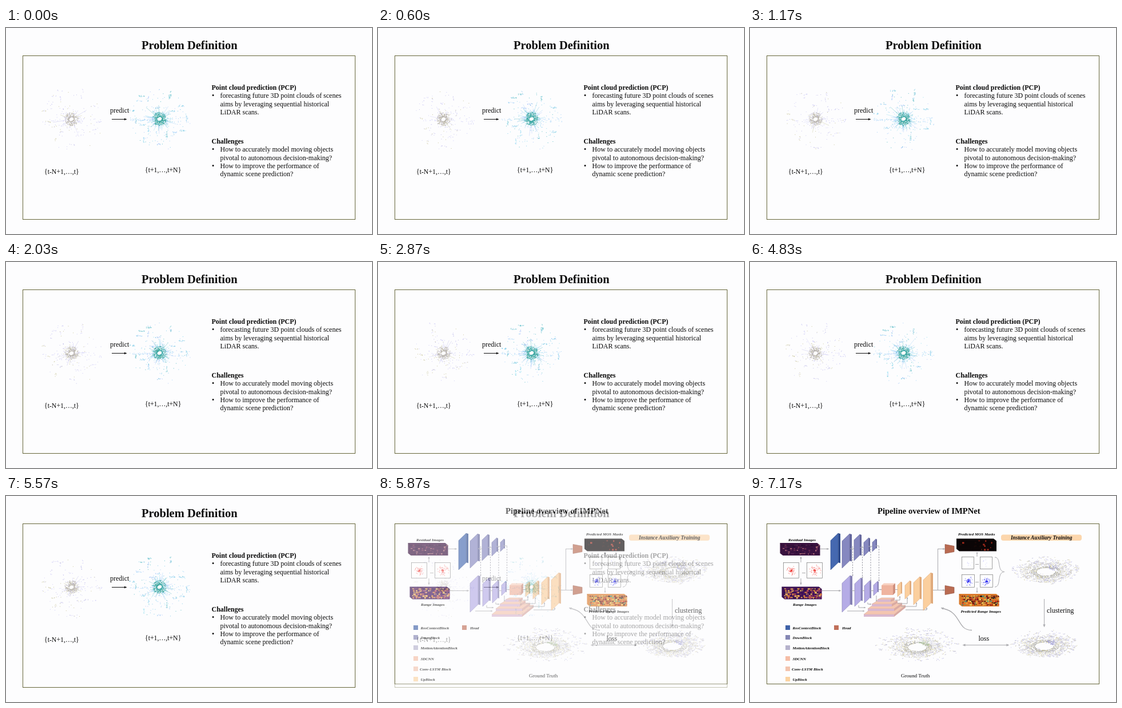
Recreate the animation shown at these times as an HTML page with a canvas. Size 640 by 360 pixels, loop 8000 ms.

```html
<!DOCTYPE html>
<html lang="en">
<head>
<meta charset="utf-8">
<title>Point cloud prediction</title>
<style>
html, body { margin: 0; width: 100%; height: 100%; overflow: hidden; background: #fdfdfe; }
.slide { position: absolute; left: 0; top: 0; width: 640px; height: 360px; background: #fdfdfe; }
.slide canvas, .slide svg { position: absolute; left: 0; top: 0; }
text { font-family: "Liberation Serif", "Times New Roman", serif; font-size: 12px; fill: #0a0a0a; white-space: pre; }
.b { font-weight: bold; }
.l { font-weight: bold; font-style: italic; font-size: 7px; }
</style>
</head>
<body>
<div class="slide">
  <canvas id="define" width="640" height="360"></canvas>
  <svg width="640" height="360">
    <text class="b" x="237" y="36.5" style="font-size:20.5px">Problem Definition</text>
    <text class="b" x="359.5" y="108">Point cloud prediction (PCP)</text>
    <text x="360" y="122.3">•</text>
    <text x="374.5" y="122.3">forecasting future 3D point clouds of scenes</text>
    <text x="374.5" y="136.7">aims by leveraging sequential historical</text>
    <text x="374.5" y="151">LiDAR scans.</text>
    <text class="b" x="359.5" y="202">Challenges</text>
    <text x="360" y="216.3">•</text>
    <text x="374.5" y="216.3">How to accurately model moving objects</text>
    <text x="374.5" y="230.7">pivotal to autonomous decision-making?</text>
    <text x="360" y="245">•</text>
    <text x="374.5" y="245">How to improve the performance of</text>
    <text x="374.5" y="259.4">dynamic scene prediction?</text>
    <text x="182" y="148">predict</text>
    <text x="67" y="255" style="font-size:11.8px">{t-N+1,…,t}</text>
    <text x="243" y="252" style="font-size:11.8px">{t+1,…,t+N}</text>
  </svg>
</div>
<div class="slide" id="second">
  <canvas id="pipeline" width="640" height="360"></canvas>
  <svg width="640" height="360">
    <text class="b" x="223" y="31" style="font-size:14.6px">Pipeline overview of IMPNet</text>
    <text class="l" x="67" y="78.5">Residual Images</text>
    <text class="l" x="75" y="192">Range Images</text>
    <text class="l" x="364" y="69">Predicted MOS Masks</text>
    <text class="l" x="368.5" y="204">Predicted Range Images</text>
    <text class="l" x="456" y="76" style="font-size:9.3px">Instance Auxiliary Training</text>
    <text class="l" x="74.5" y="232.5">ResContextBlock</text>
    <text class="l" x="74.5" y="249.5">DownBlock</text>
    <text class="l" x="74.5" y="268">MotionAttentionBlock</text>
    <text class="l" x="74.5" y="287">3DCNN</text>
    <text class="l" x="73" y="305">Conv-LSTM Block</text>
    <text class="l" x="74.5" y="323">UpBlock</text>
    <text class="l" x="161" y="232.5">Head</text>
    <text x="264" y="317" style="font-size:9.2px">Ground Truth</text>
    <text x="519" y="204">clustering</text>
    <text x="399.5" y="253">loss</text>
    <text x="91" y="135" style="font-size:8px">...</text>
    <text x="394" y="120" style="font-size:8px">...</text>
    <text x="394" y="151" style="font-size:8px">...</text>
  </svg>
</div>
<script>
const LOOP = 8000, FADE_START = 5700, FADE_TIME = 270, SCAN = 100;
// spans of time in which the scans play; between them they hold
const PLAYING = [[30, 70], [270, 700], [870, 1370], [1530, 2330], [2370, 3130],
  [3200, 3300], [3500, 4300], [4370, 5170], [5200, 5570]];
// clumps of points seen around the vehicle
const CLUMPS = [[-20, -48], [-20, -36], [17, -37], [19, -46], [-36, -28], [-3, -24], [-28, 38],
  [0, 46], [12, 28], [26, 23], [38, -22], [47, 3], [-42, 2], [38, 20], [-30, 14], [-32, -42],
  [-14, -16], [22, -15], [-20, 25], [-48, -12]];
const GREY = '#a9a9ad';
const second = document.getElementById('second');
const define = document.getElementById('define').getContext('2d');
const pipeline = document.getElementById('pipeline').getContext('2d');

function random(seed) {
  let s = seed * 2654435761 >>> 0;
  return () => {
    s = s + 0x6D2B79F5 >>> 0;
    let v = Math.imul(s ^ s >>> 15, 1 | s);
    v ^= v + Math.imul(v ^ v >>> 7, 61 | v);
    return ((v ^ v >>> 14) >>> 0) / 4294967296;
  };
}

function dot(c, x, y, color, size = 1) {
  c.fillStyle = color;
  c.fillRect(x, y, size, size);
}

function line(c, pts, color = GREY, width = 1, dash = []) {
  c.strokeStyle = color;
  c.lineWidth = width;
  c.setLineDash(dash);
  c.beginPath();
  pts.forEach(p => c.lineTo(...p));
  c.stroke();
  c.setLineDash([]);
}

function shape(c, pts, fill, edge) {
  c.beginPath();
  pts.forEach(p => c.lineTo(...p));
  c.closePath();
  c.fillStyle = fill;
  c.fill();
  if (edge) {
    c.strokeStyle = edge;
    c.lineWidth = 0.6;
    c.stroke();
  }
}

function arrow(c, x0, y0, x1, y1, color = GREY, size = 4, dash = []) {
  line(c, [[x0, y0], [x1, y1]], color, 1, dash);
  const a = Math.atan2(y1 - y0, x1 - x0);
  const tip = b => [x1 - size * Math.cos(a + b), y1 - size * Math.sin(a + b)];
  shape(c, [[x1, y1], tip(0.45), tip(-0.45)], color);
}

function frame(c, bottom) {
  c.strokeStyle = '#66663a';
  c.lineWidth = 1;
  c.strokeRect(29.5, 48.5, 581, bottom - 48.5);
}

// --- first slide: scans seen from above ---

function scan(c, cx, cy, step, look) {
  const fixed = random(look.seed), live = random(look.seed * 100 + step);
  const pick = r => look.far[Math.floor(r() * look.far.length)];

  for (const [x, y] of CLUMPS) {
    const phase = fixed() * 9, upright = fixed() < 0.5, color = pick(fixed);
    const shift = (step * 0.7 + phase) % 9 - 4.5;
    const seen = live() < 0.85;
    for (let i = 0; i < look.clump; i++) {
      const u = (fixed() - 0.5) * 10, v = (fixed() - 0.5) * 2.5;
      if (seen && live() < 0.75)
        dot(c, cx + x + (upright ? v : u), cy + y + shift + (upright ? u : v), live() < 0.7 ? color : pick(live));
    }
  }
  for (let i = 0; i < look.loose; i++) {
    const a = fixed() * Math.PI * 2, r = 12 + 42 * fixed() ** 1.8;
    if (live() < 0.65) dot(c, cx + r * Math.cos(a) + live(), cy + r * Math.sin(a) + live() * 2, pick(fixed));
  }
  // level streaks along the road
  for (let i = 0; i < look.road; i++) {
    const x = -53 + 106 * fixed();
    if (live() < 0.6) dot(c, cx + x, cy + 1 + (fixed() - 0.5) * (x < 0 ? 3 : 9), look.far[0]);
  }
  for (let i = 0; i < look.rays; i++) {
    const a = fixed() * 6.283 + (live() - 0.5) * 0.08, r = 15 + 18 * fixed() * live();
    c.globalAlpha = 0.55;
    line(c, [[cx + 9 * Math.cos(a), cy + 9 * Math.sin(a)], [cx + r * Math.cos(a), cy + r * Math.sin(a)]], pick(fixed), 0.8);
    c.globalAlpha = 1;
  }
  for (let i = 0; i < look.core; i++) {
    const a = fixed() * 6.283, r = 3.5 + 8.5 * fixed() ** 1.4;
    const color = look.near[Math.floor(fixed() * look.near.length)];
    dot(c, cx + r * Math.cos(a) + (live() - 0.5) - 0.5, cy + r * Math.sin(a) + (live() - 0.5) - 0.5, color);
  }
  c.fillStyle = '#fdfdfe';
  c.beginPath();
  c.ellipse(cx, cy, 4, 2.8, -0.4, 0, 7);
  c.fill();
}

const past = { seed: 5, clump: 7, loose: 130, road: 45, rays: 12, core: 330,
  far: ['#cbc9f6', '#d2cff5', '#c4c1ea', '#c9c59c'], near: ['#bcb7a6', '#c9c4b0', '#b9b4d2', '#aaa69a'] };
const future = { seed: 9, clump: 15, loose: 200, road: 100, rays: 46, core: 480,
  far: ['#a4d2f8', '#84cdea', '#b2c9fa', '#5cbcc6', '#96def0'], near: ['#2fa19a', '#46aeaa', '#38a08e', '#66bccd'] };

let lastStep = -1;
function drawDefine(step) {
  if (step === lastStep) return;
  lastStep = step;
  define.clearRect(0, 0, 640, 360);
  frame(define, 334.5);
  arrow(define, 185, 159.5, 211, 159.5, '#111', 4.5);
  scan(define, 114.5, 159.5, step, past);
  scan(define, 268.5, 159, step, future);
}

// --- second slide ---

function panel(c, x, y0, y1, w, color, side) {
  const s = w * 0.75, e = Math.max(1.5, w * 0.22);
  shape(c, [[x, y0 + s], [x + w - e, y0], [x + w - e, y1 - s], [x, y1]], color, side);
  shape(c, [[x + w - e, y0], [x + w, y0 + 1], [x + w, y1 - s + 1], [x + w - e, y1 - s]], side);
}

function slab(c, x, y, seed, base, spots, count) {
  const r = random(seed);
  const ends = [[x, y], [x + 65, y], [x + 70, y + 4], [x + 70, y + 22], [x + 5, y + 22], [x, y + 18]];
  c.save();
  shape(c, ends, base);
  c.clip();
  for (let i = 0; i < count; i++) {
    c.fillStyle = spots[Math.floor(r() * spots.length)];
    c.fillRect(x + 4 + r() * 65, y + 3 + Math.floor(r() * 6) * 3, 1 + r() * 3, 1 + r() * 2);
  }
  c.restore();
  line(c, [[x, y + 1], [x + 5, y + 5], [x + 70, y + 5]], 'rgba(0,0,0,.35)', 0.7);
}

function tile(c, x, y, size, color, seed, dense) {
  const r = random(seed);
  c.fillStyle = '#fff';
  c.fillRect(x, y, size, size);
  c.strokeStyle = '#777';
  c.lineWidth = 0.7;
  c.strokeRect(x, y, size, size);
  for (let i = 0; i < (dense ? 95 : 7); i++) {
    const a = r() * 6.283, d = size * (dense ? 0.4 * r() ** 2.3 : 0.35 * r());
    c.globalAlpha = dense ? 0.75 : 0.3;
    dot(c, x + size / 2 + d * Math.cos(a), y + size / 2 + d * Math.sin(a), color);
  }
  c.globalAlpha = 1;
}

// a scan seen from a low angle: rings on the ground with walls behind
function ground(c, cx, cy, w, seed, tint) {
  const r = random(seed), tones = ['#c9c7ee', '#b9b7cc', '#d4cfa4', '#c3c1e6'];
  for (let i = 0; i < 210; i++) {
    const a = r() * 6.283, d = 0.45 + 0.55 * r();
    const x = cx + w * d * Math.cos(a), y = cy + w * 0.38 * d * Math.sin(a);
    const len = 1 + Math.floor(r() * 4), up = r() * 7;
    for (let k = 0; k < len; k++) dot(c, x + k * 1.2, y - up + k * (r() - 0.5), tones[Math.floor(r() * 4)]);
  }
  for (let ring = 0; ring < 11; ring++) {
    const rad = 17 + ring * 2.7, gap = r() * 6.283;
    for (let a = 0; a < 6.283; a += 1.1 / rad) {
      if (r() < 0.25 + ring * 0.045 || Math.abs(a - gap) < 0.3) continue;
      const near = ring < 4;
      c.globalAlpha = near ? 0.85 : 0.6;
      dot(c, cx + rad * Math.cos(a), cy + rad * 0.42 * Math.sin(a),
        r() < 0.18 ? '#c8bc68' : near ? '#96958f' : r() < 0.5 ? '#a9a7c8' : '#b4b3ac');
    }
  }
  c.globalAlpha = 1;
  for (let i = 0; i < 34; i++) dot(c, cx + 3 + r() * 17, cy - 11 + r() * 9, tint, 1.2);
  c.fillStyle = '#fdfdfe';
  c.beginPath();
  c.ellipse(cx, cy, 14, 4.5, 0, 0, 7);
  c.fill();
}

function drawPipeline() {
  const c = pipeline;
  frame(c, 328.5);

  // inputs
  slab(c, 52.5, 82, 3, '#39123f', ['#50204f', '#682a50', '#2a0c36', '#a06070'], 60);
  slab(c, 55.5, 158.5, 4, '#3a1152', ['#e08a3c', '#f0b860', '#7a2a68', '#b84a58', '#4c1668'], 190);
  tile(c, 58.5, 116.5, 27, '#f03a34', 11, true);
  tile(c, 99.5, 116.5, 27, '#f03a34', 12, true);
  arrow(c, 89, 116, 89, 106);
  arrow(c, 89, 144, 89, 155);
  arrow(c, 123, 92.5, 138, 92.5);
  arrow(c, 126, 165.5, 159, 165.5);

  // encoders
  panel(c, 141, 65, 129, 17, '#4568b0', '#2c4a8c');
  [[161, 66, 126, 17], [182, 67, 113, 13], [199, 73, 105, 11], [214, 75, 97, 8]]
    .forEach(p => panel(c, ...p, '#8688c0', '#5f6299'));
  [[161, 139, 203, 18], [183, 143, 193, 14], [200, 148, 187, 12], [216, 149, 174, 9]]
    .forEach(p => panel(c, ...p, '#b5ace6', '#8580b4'));
  [[179.5, 140], [196.5, 144], [211, 149], [225.5, 149]].forEach(([x, y]) => arrow(c, x, 88, x, y, '#9a9aa4', 3, [2.5, 2]));
  [[178, 92], [195, 90], [210, 88], [222, 87]].forEach(([x, y]) => line(c, [[x - 3, y], [x + 4, y]]));
  line(c, [[178, 165.5], [183, 165.5]]);
  line(c, [[196, 165.5], [200, 165.5]]);
  line(c, [[211, 165.5], [216, 165.5]]);
  arrow(c, 225, 163.5, 231, 163.5, GREY, 3);

  // skip links and flat plates
  [[170, 201, 200], [190, 191, 202], [206, 186, 212], [221, 174, 223]].forEach(([x, y, to], i) => {
    const low = 201 - i * 6;
    line(c, [[x, y], [x, low]]);
    arrow(c, x, low, to, low, GREY, 3);
  });
  [[199, 211, 73, 20], [206, 201, 60, 14], [213, 193, 45, 10], [223, 185, 30, 7]].forEach(([x, y, w, h]) => {
    shape(c, [[x, y - 4], [x + w - h, y - 4], [x + w, y - h], [x + h, y - h]], '#f4c6b0', '#d5a8a2');
    shape(c, [[x, y - 4], [x + w - h, y - 4], [x + w - h, y], [x, y]], '#d9b8cf');
    shape(c, [[x + w - h, y - 4], [x + w, y - h], [x + w, y - h + 4], [x + w - h, y]], '#d9aaa2');
  });
  [[254, 182, 262, 178], [258, 188, 275, 180], [264, 193, 291, 189], [272, 199, 309, 198]].forEach(([x, y, to, end]) => {
    line(c, [[x, y], [to, y]]);
    arrow(c, to, y, to, end - 3, GREY, 3);
  });
  shape(c, [[230, 156], [234, 152.5], [254, 152.5], [250, 156]], '#f8d0c0');
  shape(c, [[230, 156], [250, 156], [250, 173], [230, 173]], '#efb49f');
  shape(c, [[250, 156], [254, 152.5], [254, 169], [250, 173]], '#cf907e');

  // decoder and heads
  [[258, 150, 176, 8], [271, 148, 180, 11], [286, 141, 190, 14], [303, 134, 200, 17]]
    .forEach(p => panel(c, ...p, '#fbcf9e', '#dfa878'));
  line(c, [[254, 163.5], [258, 163.5]]);
  line(c, [[320, 164.5], [328.5, 164.5], [328.5, 92.5]]);
  [92.5, 164.5].forEach(y => {
    arrow(c, 328, y, 341, y);
    shape(c, [[341, y - 8], [357, y - 5], [357, y + 5], [341, y + 8]], '#b96b52', '#8e4c3c');
  });

  // outputs
  slab(c, 361, 74.5, 6, '#0b0506', ['#1c0a08', '#0b0506', '#0b0506', '#a02a1c'], 40);
  slab(c, 365.5, 171, 7, '#d97a2c', ['#c8341c', '#f0a63c', '#7a1814', '#e8d060', '#4e9a7c', '#201010'], 230);
  tile(c, 370.5, 106.5, 21, '#5a5af0', 21, false);
  tile(c, 402.5, 106.5, 21, '#5a5af0', 22, false);
  tile(c, 370.5, 137.5, 22, '#2a2af0', 23, true);
  tile(c, 402.5, 137.5, 22, '#2a2af0', 24, true);
  arrow(c, 397, 106, 397, 98, GREY, 3);
  arrow(c, 397, 160, 397, 169, GREY, 3);
  c.strokeStyle = GREY;
  c.lineWidth = 1;
  c.beginPath();
  c.moveTo(428, 107);
  c.bezierCurveTo(440, 107, 431, 132, 445, 132.5);
  c.bezierCurveTo(431, 133, 440, 159, 428, 159);
  c.stroke();

  // auxiliary branch
  c.fillStyle = '#fcd6ac';
  c.beginPath();
  c.roundRect(439, 67.5, 141, 10.5, 4);
  c.fill();
  ground(c, 517, 132, 60, 31, '#a8a6d8');
  ground(c, 514, 262, 60, 32, '#9a98e0');
  ground(c, 292, 264, 74, 33, '#a9c49a');
  arrow(c, 514.5, 180, 514.5, 229, GREY, 5);
  arrow(c, 412, 260.5, 453, 260.5, GREY, 5);
  arrow(c, 412, 260.5, 372, 260.5, GREY, 5);
  c.lineWidth = 1.3;
  c.beginPath();
  c.moveTo(388, 234.5);
  c.bezierCurveTo(362, 235, 370, 204, 339, 197);
  c.stroke();
  arrow(c, 340, 197.2, 334, 195.5, GREY, 5);

  // legend
  [['#3f62a8', 226], ['#8587b4', 243], ['#b6b2cc', 261], ['#f5bda6', 280], ['#f3c4ae', 298], ['#fbd3a2', 316]]
    .forEach(([color, y]) => dot(c, 62, y, color, 8));
  dot(c, 147, 226, '#c0705a', 8);
}

function draw(now) {
  const t = now % LOOP;
  const played = PLAYING.reduce((sum, [a, b]) => sum + Math.max(0, Math.min(t, b) - a), 0);
  drawDefine(Math.ceil(played / SCAN));
  second.style.opacity = Math.min(1, Math.max(0, (t - FADE_START) / FADE_TIME));
}

drawPipeline();
const start = performance.now();
function tick() {
  draw(performance.now() - start);
  requestAnimationFrame(tick);
}
tick();
</script>
</body>
</html>
```
